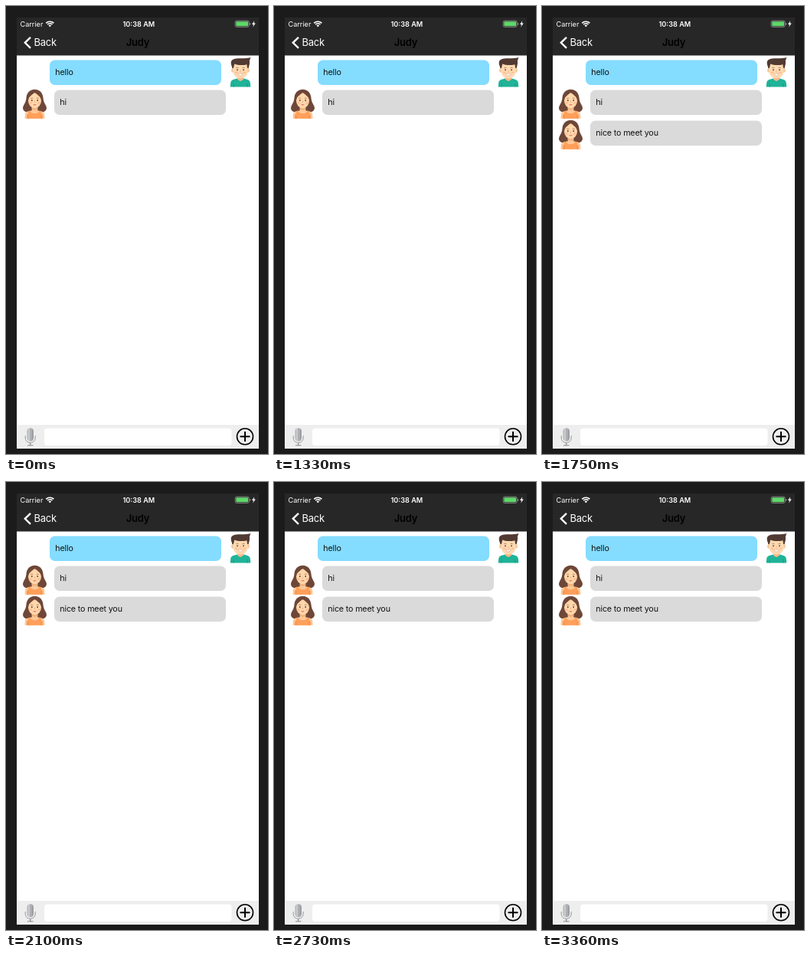
Animation of 342x584 px, one loop 3.43 s. Source, as an HTML page with a canvas:

```html
<!DOCTYPE html>
<html lang="en">
<head>
<meta charset="utf-8">
<title>Chat</title>
<style>
html, body { margin: 0; width: 100%; height: 100%; overflow: hidden; background: #1b1b1b; }
canvas { display: block; width: 342px; height: 584px; }
</style>
</head>
<body>
<canvas id="stage"></canvas>
<script>
const W = 342, H = 584, LOOP = 3430, REPLY_AT = 1400;
const canvas = document.getElementById('stage');
const ctx = canvas.getContext('2d');
const dpr = window.devicePixelRatio || 1;
canvas.width = W * dpr;
canvas.height = H * dpr;

function box(x, y, w, h, color, r = 0) {
  ctx.fillStyle = color;
  ctx.beginPath();
  ctx.roundRect(x, y, w, h, r);
  ctx.fill();
}

function oval(x, y, rx, ry, color) {
  ctx.fillStyle = color;
  ctx.beginPath();
  ctx.ellipse(x, y, rx, ry, 0, 0, Math.PI * 2);
  ctx.fill();
}

function shape(d, color) {
  ctx.fillStyle = color;
  ctx.fill(new Path2D(d));
}

function line(d, color, width, cap = 'butt') {
  ctx.strokeStyle = color;
  ctx.lineWidth = width;
  ctx.lineCap = cap;
  ctx.stroke(new Path2D(d));
}

function text(str, x, y, size, { color = '#000', weight = 400, align = 'left', gap = 0 } = {}) {
  ctx.font = `${weight} ${size}px Inter, Roboto, sans-serif`;
  ctx.letterSpacing = gap + 'px';
  ctx.textAlign = align;
  ctx.fillStyle = color;
  ctx.fillText(str, x, y);
}

function at(x, y, draw) {
  ctx.save();
  ctx.translate(x, y);
  draw();
  ctx.restore();
}

function face(x, y, gap) {
  for (const s of [-1, 1]) {
    oval(x + s * gap, y, 0.85, 1, '#4b342c');
    oval(x + s * (gap + 1.6), y + 3.4, 1.6, 1.3, 'rgba(250,150,120,.4)');
    line(`M${x + s * (gap - 1.4)} ${y - 2.6}q${s * 1.5} -.8 ${s * 3} 0`, '#8a6049', 0.7);
  }
  line(`M${x} ${y + 0.5}v2.6`, '#efb283', 1);
}

// Origin: top centre of the hair
function girl() {
  shape('M0 0C-7 0 -10.5 5 -11 11C-11.4 16 -13 18 -15 22C-16.5 26 -14 29 -10 29.5L10 29.5' +
        'C14 29 16.5 26 15 22C13 18 11.4 16 11 11C10.5 5 7 0 0 0Z', '#6e4738');
  shape('M-3.8 21h7.6v6.5c5 1 8.6 1.2 8.8 5l.4 5.5h-26l.4-5.5c.2-3.8 3.8-4 8.8-5z', '#fdc896');
  shape('M-3.8 22.5q3.8 4.5 7.6 0v3q-3.8 3-7.6 0z', '#efb07d');
  shape('M-8 28l2 0q1 3.4 6 3.4t6-3.4h2l.8 3.8q2 1 1.8 3v3.2h-21.2v-3.2q-.2-2 1.8-3z', '#ff9f5a');
  line('M-8.6 33v5M8.6 33v5', '#ef8848', 0.8);
  oval(0, 14.4, 8.5, 10, '#ffd7ab');
  shape('M0 3.2C-3 7.5 -7.5 8.2 -9 14.5C-10 7 -6.5 2.4 0 2.4C6.5 2.4 10 7 9 14.5C7.5 8.2 3 7.5 0 3.2Z', '#6e4738');
  face(0, 14.2, 3.7);
  shape('M-2.4 19.2q2.4 .8 4.8 0q-2.4 3.2 -4.8 0z', '#e4574f');
}

function boy() {
  shape('M-13.3 38.5l.5-5.4c.3-3 2.3-4 5-4.6l4.3-1.2h7l4.3 1.2c2.7 .6 4.7 1.6 5 4.6l.5 5.4z', '#1fb398');
  shape('M-4 25h8v3.2q-4 5.4 -8 0z', '#f2b98a');
  line('M-9 34v4.5M9 34v4.5', '#159681', 0.8);
  oval(-10, 17, 1.9, 2.8, '#f7c79a');
  oval(10, 17, 1.9, 2.8, '#f7c79a');
  shape('M-9.5 9h19v9c0 5.5-4.5 9.5-9.5 9.5s-9.5-4-9.5-9.5z', '#ffd9b0');
  shape('M-10.4 14.5C-11.8 10 -12.8 8 -12 5C-11 2.5 -8 1.6 -5 1.4C1 1 6 2 13.4 0' +
        'C12.4 2 12.8 2.6 11.8 4.2C12.6 7 11.5 10.5 10.4 14.5L9 13.8L8.4 9.2' +
        'C3 10.6 -3 10.4 -7.8 8.6L-9 13.8Z', '#513a32');
  face(0, 16.3, 4);
  shape('M-3.3 21.2h6.6q-.6 2.8-3.3 2.8t-3.3-2.8z', '#fff');
  line('M-3.3 21.2h6.6q-.6 2.8-3.3 2.8t-3.3-2.8z', '#d98d68', 0.5);
}

function statusBar() {
  const white = { color: '#fff' };
  text('Carrier', 18.5, 26.7, 9.15, white);
  text('10:38 AM', 173.3, 26.7, 9.15, { color: '#fff', weight: 600, align: 'center' });

  // Wi-Fi fan
  const up = -Math.PI / 2, spread = 0.8;
  ctx.strokeStyle = '#fff';
  ctx.lineCap = 'butt';
  for (const [r, w] of [[7, 1.6], [4.4, 1.5], [1.3, 2.4]]) {
    ctx.lineWidth = w;
    ctx.beginPath();
    ctx.arc(57.3, 27.2, r, up - spread, up + spread);
    ctx.stroke();
  }

  // Battery and charging bolt
  ctx.strokeStyle = '#9a9a9a';
  ctx.lineWidth = 0.8;
  ctx.beginPath();
  ctx.roundRect(299.2, 19.2, 18, 8.2, 2);
  ctx.stroke();
  box(300.3, 20.3, 15.8, 6, '#5fd769', 1);
  box(318.1, 21.9, 1, 2.8, '#9a9a9a', 0.5);
  shape('M324.2 19.3l-3.2 4.6h2.1l-1 3.6 3.7-4.9h-2.2z', '#fff');
}

function navBar() {
  box(14, 15, 316, 49.5, '#272727');
  statusBar();
  line('M32 40.8L24.8 47.8L32 54.8', '#fff', 2.4);
  text('Back', 36.6, 52.4, 13, { color: '#fff', gap: -0.3 });
  text('Judy', 172, 52.3, 13, { weight: 600, align: 'center', gap: -0.2 });
}

function inputBar() {
  box(14, 546, 316, 31, '#eeeeee');
  box(50, 550.5, 244.5, 22.5, '#fff', 4);

  // Microphone
  const metal = ctx.createLinearGradient(27, 0, 36, 0);
  metal.addColorStop(0, '#a4a6aa');
  metal.addColorStop(0.35, '#d0d2d5');
  metal.addColorStop(1, '#8d8f94');
  box(27.5, 550, 8.4, 17.4, metal, 4.2);
  line('M31.7 551v15.5', '#9b9da2', 0.7);
  line('M25.2 560v3.2a6.5 6.2 0 0 0 13 0v-3.2', '#989a9e', 1);
  line('M31.7 569.2v3.2M28 572.7h7.4', '#85878b', 1.1);

  // Plus button
  ctx.strokeStyle = '#000';
  ctx.lineWidth = 1.6;
  ctx.beginPath();
  ctx.arc(312, 561.3, 10.5, 0, Math.PI * 2);
  ctx.stroke();
  line('M306.3 561.3h11.4M312 555.6v11.4', '#000', 2, 'round');
}

function bubble(str, x, y, color) {
  box(x, y, 224, 32.5, color, 7);
  text(str, x + 7.3, y + 19.8, 10.7, { color: '#111', gap: -0.15 });
}

function received(str, y) {
  bubble(str, 63, y, '#dadada');
  at(37.5, y - 0.7, girl);
}

function draw(t) {
  ctx.setTransform(dpr, 0, 0, dpr, 0, 0);
  box(0, 0, W, H, '#1b1b1b');
  box(14, 64, 316, 482, '#fff');
  navBar();
  bubble('hello', 57, 70.5, '#84dcff');
  at(306, 67, boy);
  received('hi', 109.5);
  if (t >= REPLY_AT) received('nice to meet you', 149.5);
  inputBar();
}

const start = performance.now();
function tick() {
  draw((performance.now() - start) % LOOP);
  requestAnimationFrame(tick);
}
tick();
</script>
</body>
</html>
```
